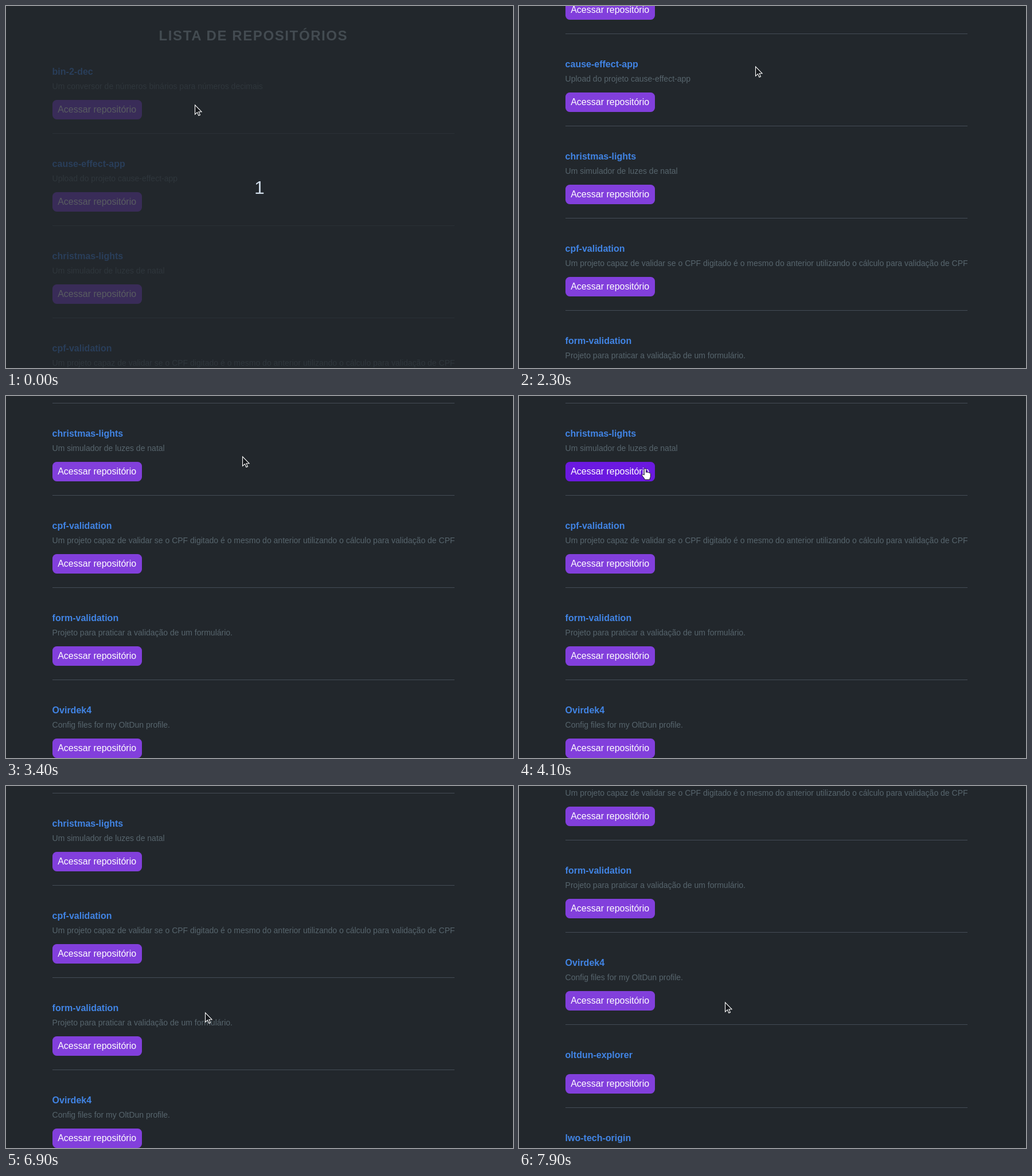
An HTML page that plays this animation: 884x632 px, repeating every 8 s.

```html
<!DOCTYPE html>
<html lang="pt-BR">
<head>
<meta charset="utf-8">
<title>Lista de repositórios</title>
<style>
  html, body { margin: 0; width: 100%; height: 100%; overflow: hidden; background: #22272c; }
  svg { display: block; width: 884px; height: 632px; }
  text { font-family: "Liberation Sans", Arial, sans-serif; }
  .title { font-size: 24px; font-weight: bold; letter-spacing: 1.6px; fill: #a9b8c0; }
  .name { font-size: 16px; font-weight: bold; fill: #4184e4; }
  .desc { font-size: 14px; fill: #57656d; }
  .label { font-size: 16px; fill: #fff; }
  .button { fill: #823fdc; }
  .rule { fill: #444c56; }
  .count { font-size: 32px; fill: #cdd9e5; }
  .hover .button { fill: #6b19e0; }
  .linked .name { text-decoration: underline; }
</style>
</head>
<body>
<svg viewBox="0 0 884 632">
  <g id="page">
    <text class="title" x="266.6" y="60">LISTA DE REPOSITÓRIOS</text>
  </g>
  <text id="count" class="count" x="442" y="328" text-anchor="middle">1</text>
  <path id="arrow" d="M.5 .8V17.2L4.4 13.6 6.9 19.2 9.4 18.1 7 12.7H12Z" fill="#15181c" stroke="#fff" stroke-width="1.1"/>
  <path id="hand" d="M-1.8 11V1.3a1.7 1.7 0 0 1 3.4 0V6.5c.6-.9 2.6-.9 2.9.3 .7-.7 2.4-.5 2.7.7 .8-.5 2.2 0 2.2 1.3V13c0 2.5-1.5 3.2-1.5 6H-.8c-.5-3-3.6-5-4.6-7.4 -.8-2 1.9-2.5 3.6-.6z" fill="#fff" stroke="#15181c"/>
</svg>
<script>
const LOOP = 8000, STEP = 100;
const LEFT = 80.6, PITCH = 161, DESC_GAP = 16;
const DIM = .25, FADE = 400;

const repos = [
  ['bin-2-dec', 'Um conversor de números binários para números decimais'],
  ['cause-effect-app', 'Upload do projeto cause-effect-app'],
  ['christmas-lights', 'Um simulador de luzes de natal'],
  ['cpf-validation', 'Um projeto capaz de validar se o CPF digitado é o mesmo do anterior utilizando o cálculo para validação de CPF'],
  ['form-validation', 'Projeto para praticar a validação de um formulário.'],
  ['Ovirdek4', 'Config files for my OltDun profile.'],
  ['oltdun-explorer', ''],
  ['lwo-tech-origin', '']
];

const linear = p => p;
const easeIn = p => p ** 2.9;
const easeOut = p => 1 - easeIn(1 - p);

// Each move: begin, end, easing, target
const wheel = [
  [1500, 1800, easeIn, [87]],
  [2000, 2300, easeIn, [174]],
  [2500, 2900, easeOut, [261]],
  [3100, 3400, easeIn, [371]],
  [6900, 7200, easeIn, [480]],
  [7300, 7600, easeIn, [584]],
  [7700, 8000, easeIn, [671]]
];
const mouse = [
  [0, 400, linear, [347, 150]],
  [500, 1100, linear, [400, 106]],
  [1200, 1400, linear, [412, 105]],
  [3400, 4100, linear, [220, 127]],
  [4100, 4500, linear, [250, 205]],
  [4500, 4900, linear, [224, 275]],
  [4900, 5600, linear, [173, 357]],
  [5600, 5900, linear, [175, 386]],
  [6000, 6300, linear, [165, 446]],
  [6400, 6900, linear, [347, 395]],
  [7700, 7900, linear, [359, 377]]
];

const clamp = p => Math.min(1, Math.max(0, p));
const within = (v, lo, hi) => v >= lo && v < hi;
const byId = id => document.getElementById(id);

function travel(moves, from, t) {
  let at = from;
  for (const [begin, end, ease, to] of moves) {
    const p = ease(clamp((t - begin) / (end - begin)));
    at = at.map((v, i) => v + (to[i] - v) * p);
  }
  return at.map(Math.round);
}

function add(parent, tag, attrs, text = '') {
  const el = document.createElementNS('http://www.w3.org/2000/svg', tag);
  for (const key in attrs) el.setAttribute(key, attrs[key]);
  el.textContent = text;
  return parent.appendChild(el);
}

const page = byId('page'), count = byId('count'), arrow = byId('arrow'), hand = byId('hand');

let nextY = 0;
const items = repos.map(([name, desc]) => {
  const y = nextY;
  const shift = desc ? 0 : -DESC_GAP;
  const group = add(page, 'g', { transform: `translate(0 ${y})` });
  const link = add(group, 'text', { class: 'name', x: LEFT, y: 120 }, name);
  add(group, 'text', { class: 'desc', x: LEFT, y: 145 }, desc);
  add(group, 'rect', { class: 'button', x: 81, y: 164 + shift, width: 156, height: 34, rx: 7.5 });
  add(group, 'text', { class: 'label', x: 90.2, y: 186 + shift }, 'Acessar repositório');
  add(group, 'rect', { class: 'rule', x: 81, y: 222 + shift, width: 701, height: 1 });
  nextY += PITCH + shift;
  return { group, y, buttonY: y + 164 + shift, right: LEFT + link.getComputedTextLength() };
});

function draw(time) {
  const t = Math.floor(time % LOOP / STEP) * STEP;
  const light = clamp(t / FADE);
  const [offset] = travel(wheel, [0], t);
  const [x, y] = travel(mouse, [329, 172], t);
  const pageY = y + offset;
  let active = false;

  for (const item of items) {
    const hover = within(x, 81, 237) && within(pageY, item.buttonY, item.buttonY + 34);
    const linked = within(x, LEFT, item.right) && within(pageY, item.y + 105, item.y + 124);
    item.group.classList.toggle('hover', hover);
    item.group.classList.toggle('linked', linked);
    active = active || hover || linked;
  }

  page.setAttribute('transform', `translate(0 ${-offset})`);
  page.setAttribute('opacity', DIM + (1 - DIM) * light);
  count.setAttribute('opacity', 1 - light);
  for (const el of [arrow, hand]) {
    el.setAttribute('transform', `translate(${x} ${y})`);
    el.style.display = (el === hand) === active ? '' : 'none';
  }
}

const start = performance.now();
function tick() {
  draw(performance.now() - start);
  requestAnimationFrame(tick);
}
tick();
</script>
</body>
</html>
```
